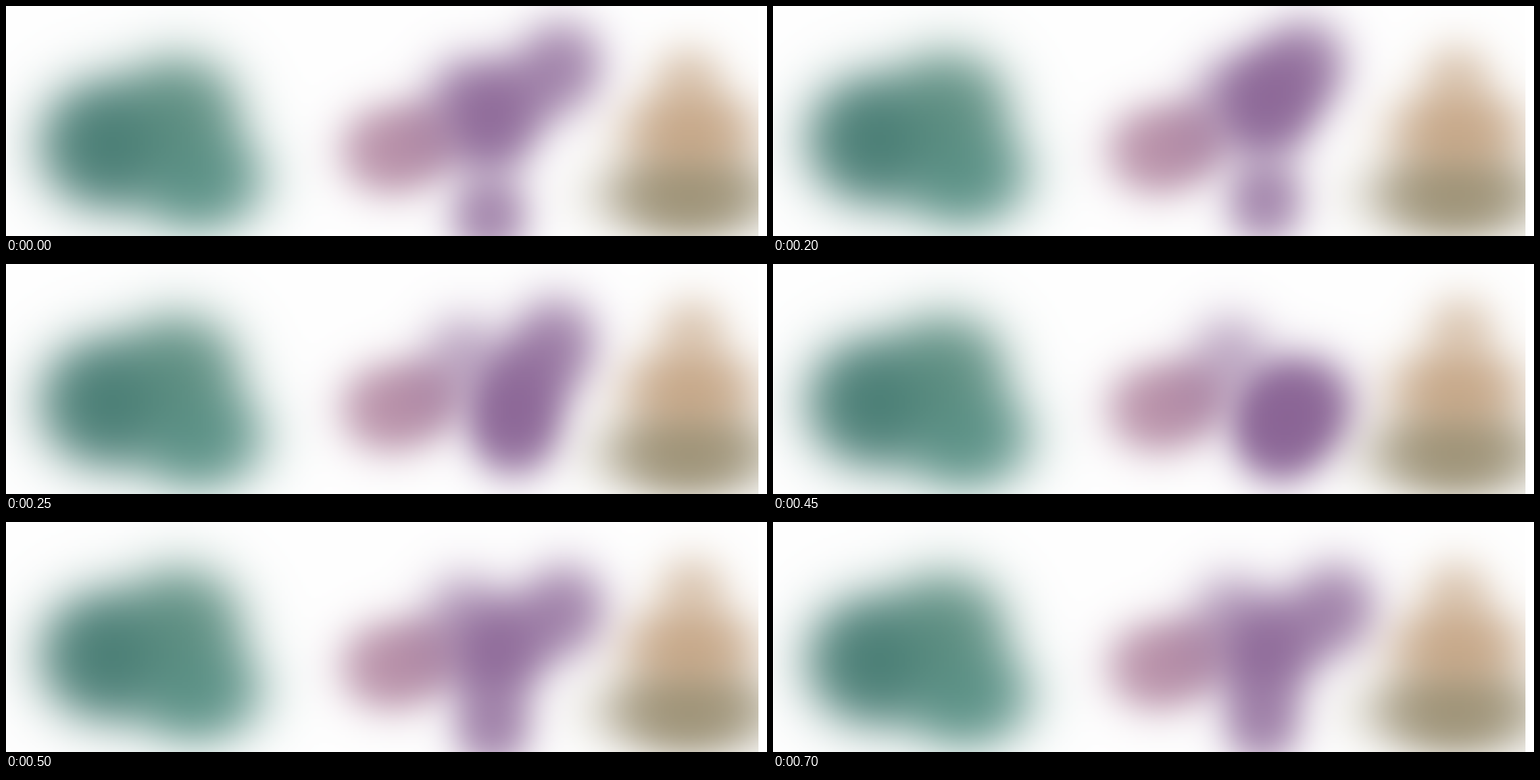
An HTML page with a canvas that plays this animation: 1157x350 px, repeating every 0.75 s.

```html
<!DOCTYPE html>
<html lang="en">
<head>
<meta charset="utf-8">
<title>Soft blobs</title>
<style>
  html, body { margin: 0; width: 100%; height: 100%; overflow: hidden; background: #fff; }
  canvas { display: block; }
</style>
</head>
<body>
<canvas id="stage" width="1157" height="350"></canvas>
<script>
const W = 1157, H = 350, LEFT = 1, RIGHT = 1144;
const LOOP = 750, STEPS = 6;
const CELL = 4;
const PAPER = 254;

const TEAL_DARK = [66, 120, 111], TEAL = [78, 137, 125], TEAL_GREY = [84, 136, 122];
const PURPLE = [137, 99, 148], MAUVE = [158, 116, 152], PINK = [177, 133, 159];
const TAN = [194, 160, 126], OLIVE = [151, 140, 111];

const stage = document.getElementById('stage').getContext('2d');
const grid = document.createElement('canvas');
grid.width = Math.ceil(W / CELL);
grid.height = Math.ceil(H / CELL);
const gridInk = grid.getContext('2d');
const image = gridInk.createImageData(grid.width, grid.height);

// Key points of the purple figure: its heart and the end of its arm.
const purpleKeys = [
  { heart: [735, 176], arm: [845, 90] },
  { heart: [748, 155], arm: [808, 88] },
  { heart: [772, 215], arm: [836, 118] },
  { heart: [770, 235], arm: [822, 212] },
  { heart: [740, 204], arm: [850, 132] },
  { heart: [744, 204], arm: [855, 130] }
];

// A lobe is a Gaussian hill of colour.
function lobe(x, y, sx, sy, weight, color) {
  return { x, y, sx, sy, weight, color };
}

function tealLobes(phase) {
  const lift = 5 * Math.cos(2 * phase - 2 * Math.PI / 3);
  return [
    lobe(155, 209 - lift, 58, 55, 2.6, TEAL_DARK),
    lobe(265 + lift / 2, 167 - lift, 55, 55, 1.9, TEAL_GREY),
    lobe(293 - lift / 2, 263 - lift, 58, 48, 1.8, TEAL)
  ];
}

function purpleLobes({ heart: [hx, hy], arm: [ax, ay] }) {
  const footY = 320 - (hx - 735) * 1.8;
  return [
    lobe(585, 220, 45, 41, 1.8, PINK),
    lobe(645, 200, 36, 38, 1, MAUVE),
    lobe(695, 135, 42, 42, 0.55, PURPLE),
    lobe(hx, hy, 42, 48, 2.1, PURPLE),
    lobe((hx + ax) / 2, (hy + ay) / 2, 40, 40, 0.85, PURPLE),
    lobe(ax, ay, 42, 44, 1.1, PURPLE),
    lobe(hx, footY, 38, 42, 1.2, PURPLE)
  ];
}

function tanLobes(phase) {
  const sway = Math.cos(phase);
  return [
    lobe(1041 - 4 * sway, 107 + 6 * sway, 38, 38, 0.6, TAN),
    lobe(1040, 195, 58, 42, 2, TAN),
    lobe(1038, 289, 70, 39, 2.4, OLIVE)
  ];
}

// Lobes add up to a density; colours mix by their share of it.
function paintField(lobes) {
  const data = image.data;
  let k = 0;
  for (let row = 0; row < grid.height; row++) {
    const y = (row + 0.5) * CELL;
    for (let col = 0; col < grid.width; col++) {
      const x = (col + 0.5) * CELL;
      let sum = 1e-9, r = 0, g = 0, b = 0;
      for (const l of lobes) {
        const dx = (x - l.x) / l.sx, dy = (y - l.y) / l.sy;
        const d = l.weight * Math.exp(-(dx * dx + dy * dy) / 2);
        sum += d;
        r += d * l.color[0];
        g += d * l.color[1];
        b += d * l.color[2];
      }
      const cover = 1 - Math.exp(-sum);
      for (const channel of [r, g, b]) {
        data[k++] = PAPER + (channel / sum - PAPER) * cover;
      }
      data[k++] = 255;
    }
  }
  gridInk.putImageData(image, 0, 0);
}

function drawStep(step) {
  const phase = step / STEPS * 2 * Math.PI;
  paintField([
    ...tealLobes(phase),
    ...purpleLobes(purpleKeys[step]),
    ...tanLobes(phase)
  ]);
  stage.imageSmoothingQuality = 'high';
  stage.drawImage(grid, 0, 0, grid.width * CELL, grid.height * CELL);
  stage.fillStyle = '#fff';
  stage.fillRect(0, 0, LEFT, H);
  stage.fillRect(RIGHT, 0, W - RIGHT, H);
}

// Steps last 125 ms, with starts rounded down to whole hundredths.
function stepAt(t) {
  let step = STEPS - 1;
  while (Math.floor(step * LOOP / STEPS / 10) * 10 > t) step--;
  return step;
}

let shown = -1;
function tick() {
  const step = stepAt(performance.now() % LOOP);
  if (step !== shown) drawStep(shown = step);
  requestAnimationFrame(tick);
}
tick();
</script>
</body>
</html>
```
